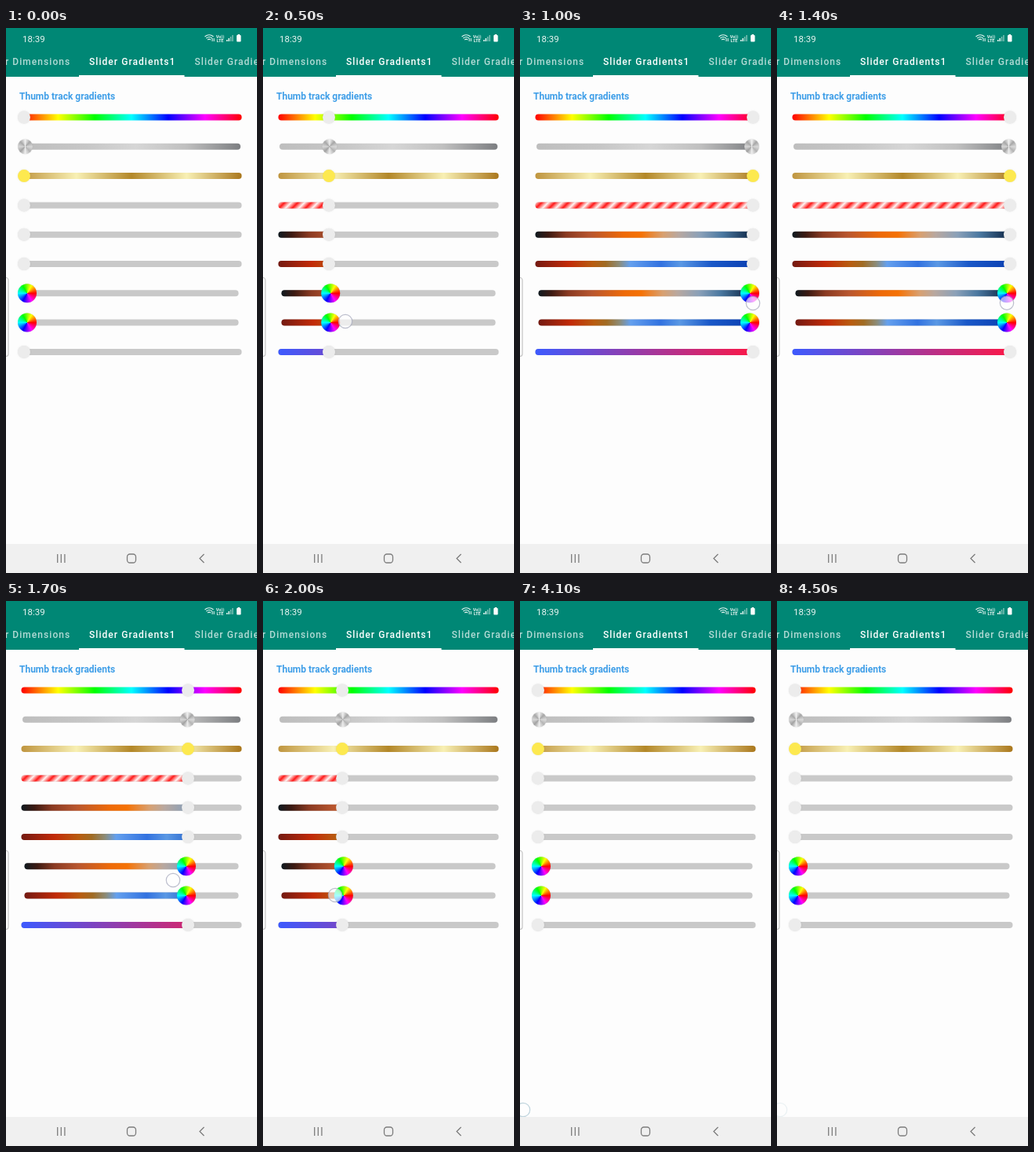
An HTML page with a canvas that plays this animation: 320 by 693 pixels, repeating every 4600 ms.

```html
<!DOCTYPE html>
<html lang="en">
<head>
<meta charset="utf-8">
<title>Slider gradients</title>
<style>
  html, body { margin: 0; width: 100%; height: 100%; overflow: hidden; background: #fdfdfd; }
  canvas { display: block; width: 100%; height: 100%; }
</style>
</head>
<body>
<canvas id="stage" width="320" height="693"></canvas>
<script>
const ctx = document.getElementById('stage').getContext('2d');
const LOOP = 4600, STEP = 100, TRACK = '#c9c9c9';

// Keyframes: [time, value...], linear between them
const thumbKeys = [[200, 0], [300, .02], [400, .1], [500, .2226], [900, .92], [1000, 1], [1400, 1],
  [1500, .965], [1600, .88], [1700, .763], [2000, .285], [2100, .14], [2200, .04], [2300, 0]];
const touchKeys = [[300, 30, 385], [500, 105, 373], [1000, 297, 350], [1200, 305, 348],
  [1450, 290, 350], [1700, 213, 355], [2000, 92, 374], [2300, 24, 425], [2700, 4, 647]];

function sample(keys, t) {
  const next = keys.findIndex(k => k[0] > t);
  if (next === 0) return keys[0].slice(1);
  if (next < 0) return keys[keys.length - 1].slice(1);
  const a = keys[next - 1], b = keys[next], p = (t - a[0]) / (b[0] - a[0]);
  return a.slice(1).map((v, i) => v + (b[i + 1] - v) * p);
}

function addStops(gradient, stops) {
  stops.forEach((s, i) => {
    const [color, at] = s.split('@');
    gradient.addColorStop(at ? +at : i / (stops.length - 1), color);
  });
  return gradient;
}

const linear = list => (x0, x1) => addStops(ctx.createLinearGradient(x0, 0, x1, 0), list.split(' '));
const sweep = list => (x, y) => addStops(ctx.createConicGradient(0, x, y), list.split(' '));
const solid = color => () => color;

function stripes(x0, x1, y) {
  const half = (x1 - x0 + 8) / 2, count = 34;
  const colors = Array.from({ length: count + 1 }, (_, i) => i % 2 ? '#ff1818' : '#fff4f2');
  return addStops(ctx.createLinearGradient(x0, y - 4, x0 + half, y - 4 + half), colors);
}

const rainbow = linear('#f00 #ff0 #0f0 #0ff #00f #f0f #f00');
const silver = linear('#bebebe #c7c7c7@.3 #d6d6d6@.52 #c0c0c0@.75 #7c7e81@1');
const gold = linear('#bf953f #f8f0b4 #b38728 #f8f0b4 #aa771c');
const sunset = linear('#101a20 #3c1a12@.06 #8a3a22@.14 #b8562f@.25 #ee6a08@.4 #f57205@.48 ' +
  '#d8a070@.58 #b8a8a0@.65 #8aa0b8@.75 #4a78a0@.85 #1c3a5c@.95 #0a2030@1');
const dusk = linear('#741a12 #c22a08@.15 #b85c10@.26 #a06c24@.32 #8c8c78@.38 #64a0ee@.43 ' +
  '#3272e0@.57 #5a98e4@.66 #1a58c8@.8 #0a3eb0@1');
const indigoRed = linear('#3d5afe #ff1744');

const plain = { r: 8, fill: solid('#ececec') };
const yellow = { r: 8, fill: solid('#fde94f') };
const metal = { r: 9.5, fill: sweep('#d8d8d8 #b4b4b4 #ededed #a2a2a2 #d6d6d6 #a8a8a8 #f0f0f0 #a6a6a6 #d8d8d8') };
const wheel = { r: 12, fill: sweep('#f00 #f0f #00f #0ff #0f0 #ff0 #f00') };

// `full` tracks are coloured along their whole length
const sliders = [
  { thumb: plain, paint: rainbow, full: true },
  { thumb: metal, paint: silver, full: true },
  { thumb: yellow, paint: gold, full: true },
  { thumb: plain, paint: stripes },
  { thumb: plain, paint: sunset },
  { thumb: plain, paint: dusk },
  { thumb: wheel, paint: sunset },
  { thumb: wheel, paint: dusk },
  { thumb: plain, paint: indigoRed }
];

function rect(x, y, w, h, fill, radius = 0) {
  ctx.fillStyle = fill;
  ctx.beginPath();
  ctx.roundRect(x, y, w, h, radius);
  ctx.fill();
}

function circle(x, y, r, fill, stroke) {
  ctx.beginPath();
  ctx.arc(x, y, r, 0, 7);
  ctx.fillStyle = fill;
  ctx.fill();
  if (stroke) {
    ctx.strokeStyle = stroke;
    ctx.stroke();
  }
}

function line(color, width, path) {
  ctx.strokeStyle = color;
  ctx.lineWidth = width;
  ctx.stroke(new Path2D(path));
}

function text(str, x, y, font, color, spacing = 0, align = 'left') {
  ctx.font = font + ' Roboto, sans-serif';
  ctx.letterSpacing = spacing + 'px';
  ctx.textAlign = align;
  ctx.fillStyle = color;
  ctx.fillText(str, x, y);
}

function drawHeader() {
  rect(0, 0, 320, 62, '#008775');
  text('18:39', 21, 17.5, '11.5px', '#e8f5f2');

  // Wi-Fi, network, signal and battery
  line('#e8f5f2', 1.1, 'M253.5 11 Q259 6.5 264.5 11 M255.3 13 Q259 10 262.7 13 M257 15 Q259 13.3 261 15');
  line('#e8f5f2', 1, 'M263 13 V17 M265.2 13 V17');
  text('Vo))', 273, 12.5, 'bold 5.5px', '#e8f5f2', 0, 'center');
  text('LTE', 273, 17.5, 'bold 5.5px', '#e8f5f2', 0, 'center');
  for (let i = 0; i < 4; i++) {
    rect(281 + i * 2.4, 15 - i * 2, 1.5, 2 + i * 2, i < 2 ? '#e8f5f2' : '#7fc0b6');
  }
  rect(294, 9, 5.5, 8.5, '#fff', 1);
  rect(295.5, 8, 2.5, 2, '#fff');

  const faded = 'rgba(255,255,255,.7)';
  text('r Dimensions', -1, 47, '500 12px', faded, 1.05);
  text('Slider Gradients1', 106, 47, '500 12px', '#fff', 1.05);
  text('Slider Gradients2', 240.5, 47, '500 12px', faded, 1.05);
  rect(93, 60, 134.5, 2, '#fff');
}

function drawNavigation() {
  rect(0, 656, 320, 37, '#f0f0f0');
  line('#7c7c7c', 1.3, 'M65.7 669 V680 M70.3 669 V680 M74.9 669 V680 M252.5 669 L247 674.5 L252.5 680');
  ctx.beginPath();
  ctx.roundRect(154.5, 669, 11, 11, 3.5);
  ctx.stroke();
}

function drawSlider({ thumb, paint, full }, index, value) {
  const y = 113.5 + index * 37.3, { r } = thumb;
  const inset = r === 8 ? 19.5 : r === 12 ? 23.5 : 21;
  const x0 = inset, x1 = 320 - inset;
  const from = inset + 3.5, thumbX = from + value * (320 - 2 * from);
  const color = paint(x0, x1, y);
  rect(x0, y - 4, x1 - x0, 8, full ? color : TRACK, 4);
  if (!full) rect(x0, y - 4, thumbX - x0, 8, color, 4);

  ctx.save();
  ctx.shadowColor = 'rgba(0,0,0,.12)';
  ctx.shadowBlur = 1.5;
  circle(thumbX, y, r, thumb.fill(thumbX, y));
  ctx.restore();
}

function drawTouch(t) {
  if (t < 300) return;
  const [x, y] = sample(touchKeys, t);
  ctx.save();
  ctx.globalAlpha = t < 4100 ? 1 : t < 4400 ? .85 : t < 4500 ? .55 : .25;
  ctx.lineWidth = 1.2;
  circle(x, y, 8.7, 'rgba(255,255,255,.65)', t < 2700 ? 'rgba(165,168,188,.75)' : 'rgba(150,185,200,.7)');
  ctx.restore();
}

function draw(t) {
  rect(0, 0, 320, 693, '#fdfdfd');
  drawHeader();
  text('Thumb track gradients', 17, 90.5, 'bold 12px', '#409fe8');

  const [value] = sample(thumbKeys, t);
  sliders.forEach((slider, i) => drawSlider(slider, i, value));

  // Edge panel handle
  rect(-6, 317.5, 9, 100, '#fff', 3);
  ctx.strokeStyle = '#c4c4c4';
  ctx.lineWidth = 1.2;
  ctx.stroke();

  drawTouch(t);
  drawNavigation();
}

function frame() {
  const t = performance.now() % LOOP;
  draw(Math.floor(t / STEP) * STEP);
  requestAnimationFrame(frame);
}
frame();
</script>
</body>
</html>
```
